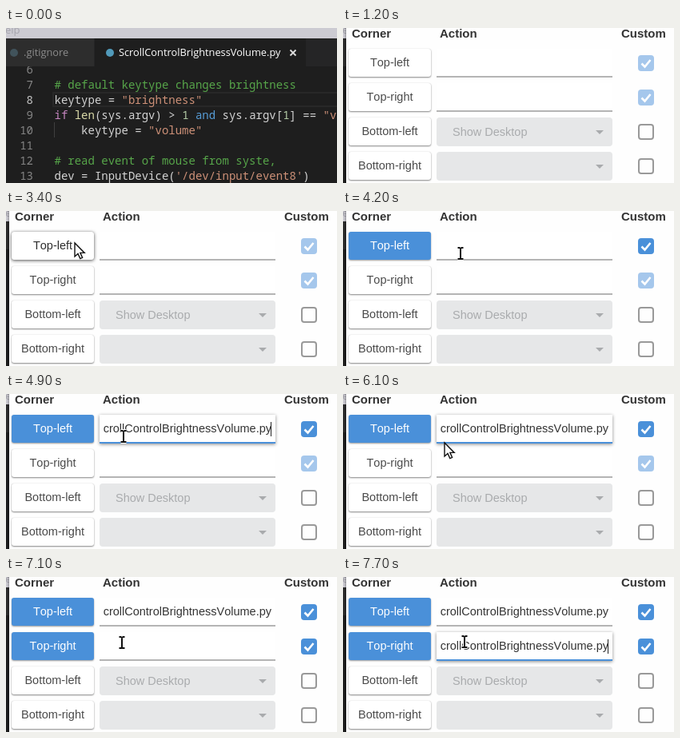
Write an HTML page that moves like this. It is 414 px wide and 194 px high and loops after 8000 ms.

```html
<!DOCTYPE html>
<html lang="en">
<meta charset="utf-8">
<title>Corner actions</title>
<style>
html, body { margin: 0; width: 100%; height: 100%; overflow: hidden; background: #1e1e1e }
#stage { position: relative; width: 414px; height: 194px; overflow: hidden }
:where(#stage div, #stage .at, #stage svg) { position: absolute; left: 0; top: 0; box-sizing: border-box; white-space: pre }

#editor { inset: 0; background: #1e1e1e; color: #d4d4d4 }
#code { inset: 48px 0 0; overflow: hidden; font: 14px/19px "Noto Sans Mono", monospace }
.num { width: 34px; text-align: right; color: #858585 }
.line { left: 60.5px }
.cm { color: #57a64a } .st { color: #ce9178 } .ctl { color: #c586c0 }
.op { color: #569cd6 } .fn { color: #dcdcaa } .lit { color: #b5cea8 }
#current { left: 58px; top: 32px; width: 360px; height: 19px; border: 2px solid #282828 }
#guide { left: 60px; top: 70px; width: 1px; height: 19px; background: #404040 }
#menu { width: 414px; height: 13px; background: #cccbd2; font: 13px/18px "Open Sans", sans-serif; color: #a5a4ac }
#tabs { top: 13px; width: 414px; height: 35px; background: #252526; font: 12.8px/35px "Open Sans", sans-serif }
.tab { height: 35px; background: #2d2d2d }
.dot { width: 10px; height: 10px; top: 13px; border-radius: 50% }

#panel { left: 4px; top: -6px; width: 420px; height: 210px; background: #fefefe; box-shadow: 0 0 3px #0008 }
#form { inset: 0; font: 14.5px "Liberation Sans", Arial, sans-serif; font-kerning: none; color: #4a4a4a }
.head { top: -2px; font-weight: bold; font-size: 15px; font-kerning: auto; color: #333; line-height: 18px }
.row { width: 414px; height: 36px }
.btn { left: 7px; width: 103px; height: 35px; border-radius: 3px; background: #fff; line-height: 35px;
  text-align: center; box-shadow: 0 1px 2px #0007, 0 0 1px #0003 }
.btn.hover { color: #2c2c2c; box-shadow: 0 1px 4px #000a, 0 0 1px #0005 }
.btn.press { background: #dfdfdf; color: #333; border: 2px solid #9f9f9f; line-height: 31px; box-shadow: 0 1px 4px #0006 }
.btn.on { background: #4a90d9; color: #fff; box-shadow: 0 1px 2px #0006 }
.field { left: 117px; width: 220px; height: 36px; background: #fff; border-bottom: 2px solid #b4b4b4;
  line-height: 35px; color: #333 }
.field.focus { border-color: #4a90d9; box-shadow: 0 1px 4px #0007 }
.clip { left: 5px; width: 210px; height: 34px; overflow: hidden }
.clip span { position: absolute; right: 0 }
.caret { top: 9px; width: 1px; height: 18px; background: #222 }
.list { left: 117px; width: 220px; height: 36px; border-radius: 4px; background: #e6e7e8; color: #a9abad;
  line-height: 36px; padding-left: 20px }
.list::after { content: ""; position: absolute; left: 199px; top: 16px; border: 5px solid transparent; border-top-color: #a9abad }
.box { left: 369px; top: 8px; width: 20px; height: 20px; border: 2px solid #999; border-radius: 4px }
.box.tick { border: 0; background: #a5c7ec }
.box.tick.on { background: #4a90d9 }
#arrow, #beam { overflow: visible }
</style>
<div id="stage">
  <div id="editor">
    <div id="code"><div id="current"></div><div id="guide"></div></div>
    <div id="menu"><span class="at" style="left:-1px;top:-7px">elp</span></div>
    <div id="tabs">
      <div class="tab" style="width:110px"></div>
      <div class="tab" style="left:111px;width:264px;background:#1e1e1e"></div>
      <div class="dot" style="left:5px;background:#41535b"></div>
      <div class="dot" style="left:125px;background:#519aba"></div>
      <span class="at" style="left:22px;color:#8c8c8c">.gitignore</span>
      <span class="at" style="left:141px;color:#fff">ScrollControlBrightnessVolume.py</span>
      <svg style="left:354px;top:13px" width="10" height="10"><path d="M1.5 1.5l7 7M8.5 1.5l-7 7" stroke="#ddd" stroke-width="1.8"/></svg>
    </div>
  </div>
  <div id="panel"></div>
  <div id="form">
    <div class="head" style="left:11px">Corner</div>
    <div class="head" style="left:121px">Action</div>
    <div class="head" style="left:348px">Custom</div>
  </div>
  <svg id="arrow" width="16" height="22">
    <path d="M0 0V17L4 13.4 6.8 19.6 9.6 18.4 6.9 12.4H12.2Z" fill="#fff" stroke="#111" stroke-width="1.4"/>
  </svg>
  <svg id="beam" width="16" height="22" fill="none">
    <defs><path id="bar" d="M-3.5-7H-1.5L0-6 1.5-7H3.5M-3.5 7H-1.5L0 6 1.5 7H3.5M0-6V6"/></defs>
    <use href="#bar" stroke="#fff" stroke-width="4"/>
    <use href="#bar" stroke="#111" stroke-width="2"/>
  </svg>
</div>
<script>
const $ = id => document.getElementById(id);
const add = (parent, cls, html = "", top) => {
  const el = document.createElement("div");
  el.className = cls;
  el.innerHTML = html;
  if (top !== undefined) el.style.top = top + "px";
  return parent.appendChild(el);
};

const tint = cls => s => `<span class="${cls}">${s}</span>`;
const [note, str, ctl, op, fn, lit] = ["cm", "st", "ctl", "op", "fn", "lit"].map(tint);
["", note("# default keytype changes brightness"), "keytype = " + str('"brightness"'),
  `${ctl("if")} ${fn("len")}(sys.argv) &gt; ${lit(1)} ${op("and")} sys.argv[${lit(1)}] == ${str('"volume"')}:`,
  "    keytype = " + str('"volume"'), "",
  note("# read event of mouse from syste,"), "dev = InputDevice(" + str("'/dev/input/event8'") + ")"
].forEach((text, i) => {
  const y = 19 * i - 6;
  add($("code"), "num", i + 6, y).style.color = i == 2 ? "#c6c6c6" : "";
  add($("code"), "line", text, y);
});

const tick = '<svg width="20" height="20"><path d="M4.5 10.5L8.5 14.5 15.5 6" fill="none" stroke="#fff" stroke-width="2.6"/></svg>';
const rows = ["Top-left", "Top-right", "Bottom-left", "Bottom-right"].map((name, i) => {
  const row = add($("form"), "row", "", 26 + 43 * i), custom = i < 2;
  const btn = add(row, "btn", name);
  const box = add(row, custom ? "box tick" : "box", custom ? tick : "");
  if (!custom) { add(row, "list", i == 2 ? "Show Desktop" : ""); return {}; }
  const field = add(row, "field");
  const text = add(field, "clip", "<span>ScrollControlBrightnessVolume.py</span>");
  return { btn, box, field, text, caret: add(field, "caret") };
});

// start and end of each phase per row, in ms
const plan = [
  { hover: 3200, press: 3500, on: 3700, focus: 4300, paste: 4900, blink: 6100, blur: 6600 },
  { hover: 6300, press: 6600, on: 6800, focus: 7300, paste: 7700, blink: 8000, blur: 8000 }
];

// pointer stops: time, x, y, text beam?
const stops = [
  [2800, 199, 52, 0], [2900, 184, 51, 1], [3000, 160, 48, 1], [3100, 134, 46, 1], [3200, 106, 43, 0],
  [3300, 93, 41, 0], [3400, 86, 40, 0], [3900, 114, 46, 0], [4000, 144, 54, 1], [4200, 147, 53, 1],
  [6100, 127, 61, 0], [6200, 119, 67, 0], [6300, 108, 76, 0], [6400, 100, 83, 0], [6500, 93, 87, 0],
  [6900, 106, 85, 0], [7000, 127, 83, 1], [7100, 145, 82, 1], [7200, 152, 81, 1]
];

const show = (el, on) => el.style.visibility = on ? "visible" : "hidden";

function draw(t) {
  const form = t >= 1200;
  show($("panel"), form);
  $("form").style.display = form ? "" : "none";
  plan.forEach((p, i) => {
    const { btn, box, field, text, caret } = rows[i], within = (a, b) => t >= a && t < b;
    btn.classList.toggle("hover", within(p.hover, p.on));
    btn.classList.toggle("press", within(p.press, p.on));
    btn.classList.toggle("on", t >= p.on);
    box.classList.toggle("on", t >= p.on);
    field.classList.toggle("focus", within(p.focus, p.blur));
    text.style.display = t >= p.paste ? "" : "none";
    caret.style.display = within(p.focus, p.blink) ? "" : "none";
    caret.style.left = t < p.paste ? "6px" : "214px";
  });
  const stop = stops.filter(s => s[0] <= t).pop();
  show($("arrow"), stop && !stop[3]);
  show($("beam"), stop && stop[3]);
  if (stop) for (const id of ["arrow", "beam"]) {
    $(id).style.left = stop[1] + "px";
    $(id).style.top = stop[2] + "px";
  }
}

const start = performance.now();
(function loop() {
  draw((performance.now() - start) % 8000);
  requestAnimationFrame(loop);
})();
</script>
</html>
```
